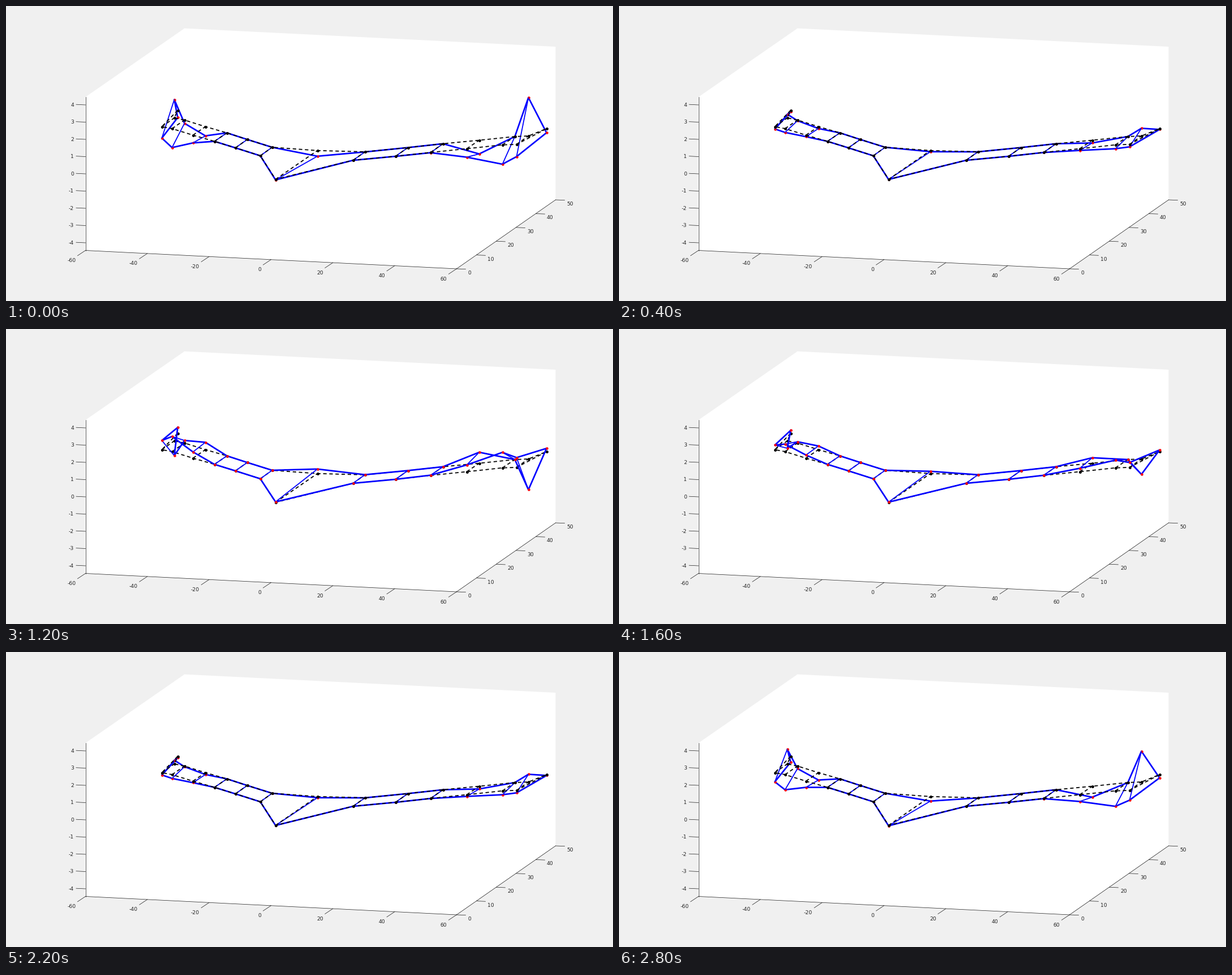
A matplotlib script that plays this animation: 1073 px wide and 522 px high, repeating every 3 s.

```python
import numpy as np
import matplotlib.pyplot as plt
from matplotlib.animation import FuncAnimation
from matplotlib.patches import Polygon

W, H, DPI = 1073, 522, 128
PX = 72 / DPI  # one pixel in points
INK = "#262626"

fig = plt.figure(figsize=(W / DPI, H / DPI), dpi=DPI, facecolor="#f0f0f0")
ax = fig.add_axes([0, 0, 1, 1])
ax.set_xlim(-0.5, W - 0.5)
ax.set_ylim(H - 0.5, -0.5)
ax.axis("off")


def line(p, q):
    ax.plot([p[0], q[0]], [p[1], q[1]], color=INK, lw=0.75 * PX, zorder=1)


def ticks(values, start, end, delta, gap, align):
    """Spread ticks from start to end, each with a label beside its tip."""
    for v, f in zip(values, np.linspace(0, 1, len(values))):
        x = start[0] + f * (end[0] - start[0])
        y = start[1] + f * (end[1] - start[1])
        tip = (x + delta[0], y + delta[1])
        line((x, y), tip)
        ax.text(tip[0] + gap[0], tip[1] + gap[1], str(v), color=INK, ha=align,
                va="center_baseline", family="DejaVu Sans", size=9.2 * PX)


# Axes box
top, left, corner, right = (140, 160.5), (140, 432), (796, 464.5), (971, 342.5)
ax.add_patch(Polygon([top, (315, 39), (971, 71.5), right, corner, left],
                     fc="white", ec="none", zorder=0))
line(top, left)
line(left, corner)
line(corner, right)
ticks(range(-60, 61, 20), left, corner, (-14, 9.3), (-3, 7.7), "right")
ticks(range(0, 51, 10), corner, right, (16, 0.7), (3.5, 5.8), "left")
ticks(range(-4, 5), (140, 418.5), (140, 174.5), (-16.5, -0.8), (-4, 0), "right")

# Each node: x, rest y, vertical shift per step of the mode amplitude
front = np.array([
    (275, 213, -4.05), (293, 216.5, -6.7), (330, 228, -2.75), (368, 239, 0),
    (405, 250.5, 0), (449, 264.5, 0), (476, 306.2, -0.2), (613, 272.5, 0),
    (688, 265.5, 0), (750, 258.6, -0.1), (814, 252, -3), (877, 245.2, -6.85),
    (902, 244.4, -4.33)])
back = np.array([
    (297, 197.5, 6.5), (315, 201.3, -1.15), (352, 213, -3.25), (390, 224, 0),
    (426, 235.7, 0), (470, 249.5, 0), (550, 255.3, -2), (634, 257.5, -0.05),
    (710, 250, 0), (772, 243.2, 0), (836, 237, -4.85), (899, 230.5, 0),
    (923, 229.5, 13.6)])
tips = np.array([(303, 184, -2.58), (955, 216.5, -1.45)])

outline = np.vstack([tips[:1], front, tips[1:], back[::-1], tips[:1]])
nodes = outline[:-1]
# Ribs joined into one path, with breaks between them
ribs = np.stack([front, back, np.full_like(front, np.nan)], axis=1).reshape(-1, 3)

DASH = (0, (3.4, 2.6))
black = [
    ax.plot(ribs[:, 0], ribs[:, 1], "k", lw=1.8 * PX, ls=DASH,
            dash_capstyle="butt")[0],
    ax.plot(outline[:, 0], outline[:, 1], "k", lw=1.8 * PX, ls=DASH,
            dash_capstyle="butt")[0],
    ax.plot(nodes[:, 0], nodes[:, 1], "ko", ms=5 * PX, mew=0)[0],
]
thick, = ax.plot([], [], "b", lw=2.7 * PX, solid_joinstyle="round")
thin, = ax.plot([], [], "b", lw=1.8 * PX, solid_capstyle="butt")
dots, = ax.plot([], [], "o", color="red", ms=4.6 * PX, mew=0)


def amplitude(k):
    return 2 * k - 5 if k <= 5 else 10 - k


def draw(k):
    a = amplitude(k)
    for artist, pts in ((thick, outline), (thin, ribs), (dots, nodes)):
        artist.set_data(pts[:, 0], pts[:, 1] + a * pts[:, 2])
    # The rest shape lies in front while the amplitude is negative
    for i, artist in enumerate(black):
        artist.set_zorder((20 if a < 0 else 2) + i)
    thick.set_zorder(10)
    thin.set_zorder(12 if a < 0 else 11)
    dots.set_zorder(11 if a < 0 else 12)
    return [thick, thin, dots, *black]


anim = FuncAnimation(fig, draw, frames=15, interval=200, repeat=True,
                     repeat_delay=0, blit=False)
plt.show()
```
